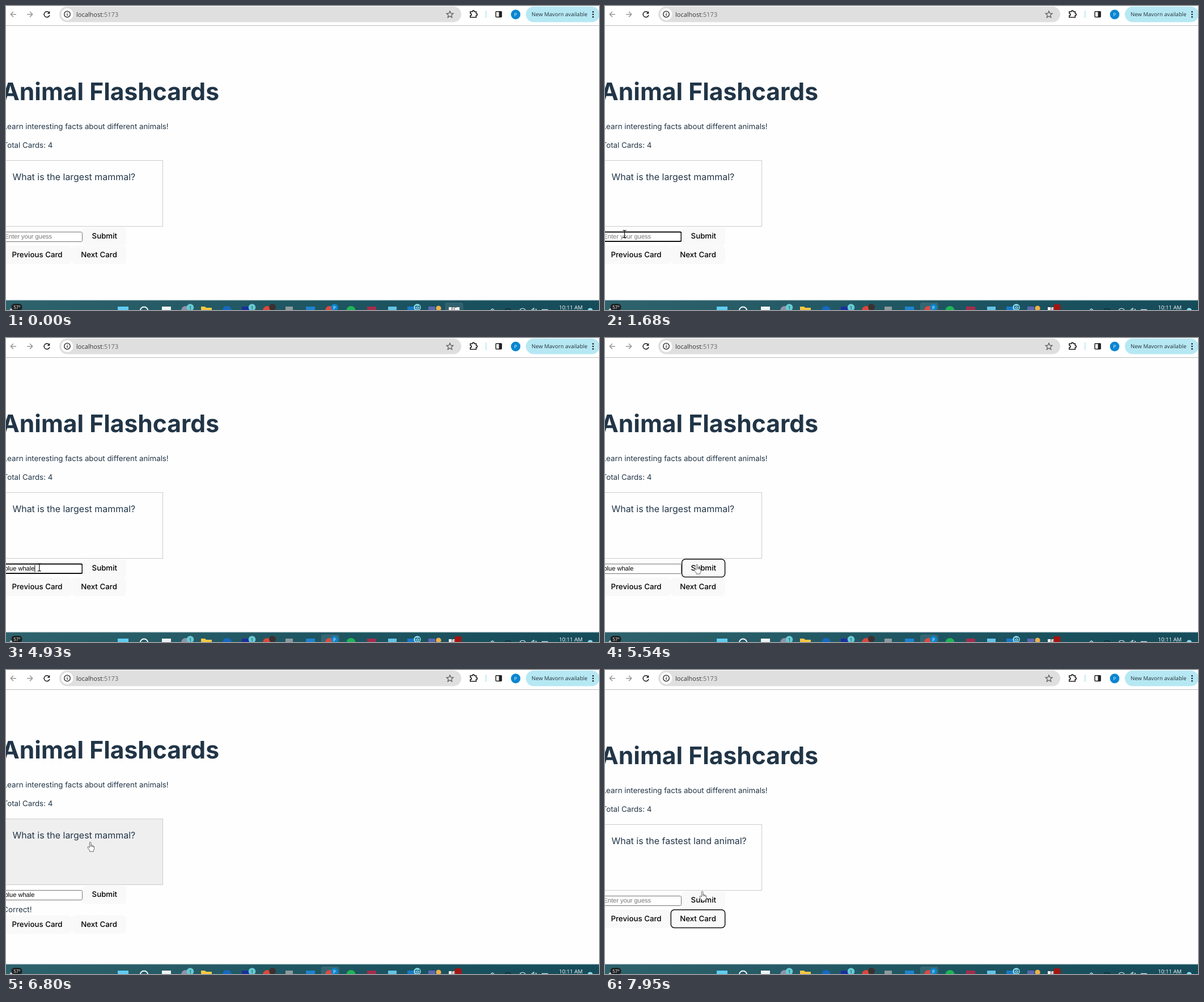
Write an HTML page that moves like this. It is 1046x536 px and loops after 8000 ms.

```html
<!DOCTYPE html>
<html lang="en">
<head>
<meta charset="utf-8">
<title>Animal Flashcards</title>
<style>
  html, body { margin: 0; width: 100%; height: 100%; overflow: hidden; background: #fefefe; }
  svg { display: block; width: 1046px; height: 536px; }
  text { font-family: Inter, sans-serif; font-size: 13.3px; font-optical-sizing: none; fill: #213547; text-rendering: geometricPrecision; }
  .end { text-anchor: end; }
  .ui { font-family: "Open Sans", "Noto Sans", sans-serif; }
  .title { font-size: 42.6px; font-weight: 700; }
  .question { font-size: 15.96px; }
  .button rect { fill: #f9f9f9; }
  .button text { font-weight: 500; fill: #000; text-anchor: middle; }
  .field { font-family: "Liberation Sans", Arial, sans-serif; font-size: 11.08px; }
  .line { fill: none; stroke: #222; stroke-width: 1.5; }
  .badge { font-size: 8px; text-anchor: middle; }
</style>
</head>
<body>
<svg viewBox="0 0 1046 536">
  <rect width="1046" height="536" fill="#fefefe"/>

  <g id="toolbar">
    <rect width="1046" height="34" fill="#fff"/>
    <rect y="34" width="1046" height="1" fill="#bdbdbd"/>
    <g class="line" style="stroke:#999">
      <path d="M18 14.7H8.5M13 10L8.3 14.7 13 19.4"/>
      <path d="M37 14.7H46.5M42 10L46.7 14.7 42 19.4"/>
    </g>
    <path class="line" d="M76 11.5A5 5 0 1 0 77 16"/>
    <path d="M77.3 9V13.7H72.6Z" fill="#222"/>
    <rect x="94" y="1" width="709" height="27.5" rx="13.7" fill="#dfdfdf"/>
    <circle cx="108" cy="14.5" r="10.5" fill="#fff"/>
    <circle class="line" cx="108" cy="14.5" r="5.3" style="stroke-width:1.3"/>
    <path class="line" d="M108 13.8V17.3M108 11.4V12.7" style="stroke-width:1.3"/>
    <text class="ui" x="124" y="18.7" style="font-size:11px;fill:#333">localhost<tspan fill="#666">:5173</tspan></text>
    <path class="line" style="stroke:#555;stroke-width:1.2" d="M783 9L784.7 12.9 788.9 13.3 785.7 16.1 786.7 20.2 783 18 779.3 20.2 780.3 16.1 777.1 13.3 781.3 12.9Z"/>
    <path class="line" style="stroke-width:1.7" d="M819 10H822.6A1.8 1.8 0 0 1 826.2 10H829.3V13A1.9 1.9 0 0 1 829.3 16.8V20H819V17A2 2 0 0 0 819 13Z"/>
    <rect x="846" y="8" width="1.5" height="13" fill="#b6e4f2"/>
    <rect class="line" x="864" y="9.7" width="10" height="9.8" rx="1"/>
    <rect x="869.5" y="9.7" width="5" height="9.8" fill="#222"/>
    <circle cx="899" cy="15" r="8.4" fill="#0a86d1"/>
    <text class="ui badge" x="899" y="17.8" style="fill:#fff">P</text>
    <rect x="917" y="1" width="130" height="27.5" rx="13.7" fill="#b6e8f3"/>
    <text class="ui" x="927" y="18.2" style="font-size:9.6px;fill:#24323a">New Mavorn available</text>
    <g fill="#222"><circle cx="1035.5" cy="10.3" r="1.4"/><circle cx="1035.5" cy="14.8" r="1.4"/><circle cx="1035.5" cy="19.3" r="1.4"/></g>
  </g>

  <g id="upper">
    <text class="title end" x="376" y="165.5">Animal Flashcards</text>
    <text class="end" x="286.7" y="217">Learn interesting facts about different animals!</text>
    <text class="end" x="82.3" y="250">Total Cards: 4</text>
    <rect id="card" x="-8.5" y="272.5" width="285" height="116" stroke="#ccc"/>
    <text class="question" id="question" x="11.5" y="307"></text>
    <rect id="input" x="-5" width="139.5" rx="2" fill="#fff"/>
    <text class="field" id="guess" x="-2.6" y="410"></text>
    <rect id="caret" y="400.5" width="1" height="12.5" fill="#000"/>
    <g class="button">
      <rect x="135" y="390" width="77" height="32.5" rx="6.5"/>
      <rect class="line" id="submitRing" x="135.6" y="390" width="76" height="31.6" rx="6" style="stroke:#101010"/>
      <text x="173.8" y="410">Submit</text>
    </g>
    <text class="end" id="correct" x="45.5" y="437">Correct!</text>
  </g>

  <g id="lower" class="button">
    <rect x="-6" y="422.5" width="122" height="32.5" rx="6.5"/>
    <text x="55" y="443">Previous Card</text>
    <rect x="116" y="422.5" width="96" height="32.5" rx="6.5"/>
    <rect class="line" id="nextRing" x="116.3" y="422.8" width="95.4" height="31.6" rx="6" style="stroke:#101010"/>
    <text x="164" y="443">Next Card</text>
  </g>

  <defs>
    <linearGradient id="teal"><stop stop-color="#2e626c"/><stop offset=".5" stop-color="#1f5662"/><stop offset="1" stop-color="#164c5a"/></linearGradient>
  </defs>
  <g id="taskbar">
    <rect y="519" width="1046" height="17" fill="url(#teal)"/>
    <rect y="518.5" width="1046" height="1" fill="#6f9299"/>
    <rect id="active" y="523.5" width="31" height="20" rx="3" fill="#fff" fill-opacity=".1" stroke="#fff" stroke-opacity=".08"/>
    <g id="icons"></g>
    <path d="M6 536L10 532 14 536Z" fill="#cfd8da"/>
    <rect x="9.5" y="525" width="19" height="12" rx="5.5" fill="#1e2224"/>
    <text class="ui badge" x="19.5" y="534" style="fill:#fff">57°</text>
    <circle cx="243.5" cy="537" r="6.6" fill="none" stroke="#f4f8f9" stroke-width="2"/>
    <path d="M344 530H351L353 532H363V536H344Z" fill="#f7c744"/>
    <circle cx="470" cy="531" r="6" fill="#3b3030"/>
    <path d="M722.5 529H729.5V534H722.5ZL726 532 729.5 529" fill="none" stroke="#124a60"/>
    <text class="ui badge" x="790" y="537" style="fill:#333">EC</text>
    <rect id="record" x="791.5" y="526" width="12" height="12" rx="3" fill="#a31512"/>
    <g fill="none" stroke="#dce7e9" stroke-width="1.2">
      <path d="M855 536L858 534 861 536M906.5 536A5 4 0 0 1 916 536M927 536L931 533V536M934 534L936 536M945 535.3H956"/>
      <path d="M880 536A6 4 0 0 1 891 536" stroke="#0d2b34"/>
    </g>
    <text class="ui" x="975.5" y="535.3" style="font-size:9.6px;fill:#fff">10:11 AM</text>
    <circle cx="1030.5" cy="537" r="4.5" fill="#8edcec"/>
  </g>

  <g id="pointer" stroke-linejoin="round">
    <path id="arrow" d="M.5 .5V14L3.6 11.2 6 16.5 8 15.6 5.7 10.4H10Z" fill="#fff" stroke="#111" stroke-width=".9"/>
    <g id="hand" fill="#fff" stroke="#333" stroke-width=".75">
      <path d="M-1.6 10V1.6Q-1.6 .3-.4 .3T.9 1.6V6Q3 5.2 3.1 7 4.9 6.2 5 8 6.6 7.5 6.6 9.3V12.4Q6.4 14 5.3 15.2V17H-1.4V15.4Q-4.2 12.4-5 9.8-4.7 7.8-3 8.8Z"/>
      <path d="M.9 6V9M3.1 7V9M5 8V9.5" fill="none"/>
    </g>
    <path id="beam" d="M-3-6.3H-1Q0-6.3 0-5.3 0-6.3 1-6.3H3M0-5.3V5.3M-3 6.3H-1Q0 6.3 0 5.3 0 6.3 1 6.3H3" fill="none" stroke="#111" stroke-width="1.2"/>
  </g>
</svg>

<script>
const LOOP = 8000;
const $ = id => document.getElementById(id);
const show = (id, on) => $(id).setAttribute('visibility', on ? 'visible' : 'hidden');
const set = (id, attrs) => { for (const k in attrs) $(id).setAttribute(k, attrs[k]); };

const square = (x, width, fill, y = 530) =>
  `<rect x="${x}" y="${y}" width="${width}" height="${536 - y}" fill="${fill}"/>`;
const disc = (x, fill, y = 537, r = 8) => `<circle cx="${x}" cy="${y}" r="${r}" fill="${fill}"/>`;
const badge = (x, fill, label = '', ink = '#123', y = 531.5) =>
  disc(x, fill, y, 6.3) + `<text class="ui badge" x="${x}" y="${y + 3}" style="fill:${ink}">${label}</text>`;

$('icons').innerHTML = [
  square(197, 19, '#5fcdf2'), square(275, 16, '#eef2f3'),
  disc(317, '#8d93a8'), badge(325, '#66cbd4', '1'),
  disc(390, '#1769bd'),
  square(416, 14, '#1b2f9c'), badge(434, '#66cbd4', '1'),
  disc(461, '#d9483b'), square(493, 13, '#8d999d'), square(529, 16, '#1e83cf'),
  disc(571, '#dd4b3e'), badge(579.5, '#0a86d1', 'P', '#fff'),
  disc(608.5, '#1fb455'), square(637, 16, '#a52c4c'), square(674, 15, '#64c3e6'),
  square(708, 15, '#1979c9'), badge(725.5, '#8bdcf0'),
  square(745, 12, '#5b67b5'), disc(763, '#eeb04b', 533, 4.6),
  square(781, 19, '#f1f1f1', 531)
].join('');

// Pointer moves: start, end, number of steps, points passed
const moves = [
  [210, 550, 6, [[794, 523], [690, 470], [426, 348]]],
  [740, 1400, 9, [[400, 352], [240, 374], [100, 402], [50, 416], [34.5, 402]]],
  [4850, 5400, 9, [[40, 403], [90, 407], [145, 404], [162.5, 399]]],
  [5810, 6210, 7, [[162, 394], [155, 350], [149, 303]]],
  [7000, 7411, 7, [[150, 312], [165, 375], [181, 456], [182, 453]]],
  [7880, 7950, 2, [[178, 425], [172, 390]]]
];

const fieldX = -2.6, fieldSize = 11.08;
const keys = [1990, 2260, 2590, 2810, 2940, 3150, 3620, 3820, 4140, 4410];
const advance = { b: .556, l: .222, u: .556, e: .556, ' ': .278, w: .722, h: .556, a: .556 };

function pointerAt(t) {
  const move = moves.filter(m => t >= m[0]).pop();
  if (!move) return null;
  const [from, to, steps, points] = move;
  const step = Math.min(steps - 1, Math.floor((t - from) / (to - from) * (steps - 1) + .05));
  const u = step / (steps - 1) * (points.length - 1);
  const i = Math.min(points.length - 2, Math.floor(u));
  return points[i].map((v, axis) => v + (points[i + 1][axis] - v) * (u - i));
}

function hitTest([x, y], shift) {
  const inside = (x0, x1, y0, y1) => x >= x0 && x < x1 && y >= y0 && y < y1;
  if (inside(0, 277, 272 - shift, 389 - shift)) return 'card';
  if (inside(0, 135, 398 - shift, 416 - shift)) return 'input';
  if (inside(135, 212, 389 - shift, 422 - shift) || inside(0, 212, 422 + shift, 455 + shift)) return 'button';
  return 'page';
}

function render(t) {
  const answered = t >= 5610 && t < 7480;
  const nextCard = t >= 7480;
  const focused = t >= 1540 && t < 5470;
  const shift = answered ? 10 : 0;

  set('upper', { transform: `translate(0 ${-shift})` });
  set('lower', { transform: `translate(0 ${shift})` });
  show('correct', answered);
  show('submitRing', t >= 5470 && t < 5810);
  show('nextRing', t >= 7411);
  $('question').textContent = nextCard ? 'What is the fastest land animal?' : 'What is the largest mammal?';

  const typed = nextCard ? '' : 'blue whale'.slice(0, keys.filter(k => t >= k).length);
  $('guess').textContent = typed || 'Enter your guess';
  $('guess').style.fill = typed ? '#000' : '#757575';
  show('caret', focused && typed);
  set('caret', { x: fieldX + fieldSize * [...typed].reduce((sum, c) => sum + advance[c], 0) });
  set('input', focused
    ? { y: 398.5, height: 16.5, stroke: '#101010', 'stroke-width': 2 }
    : { y: 398.5, height: 17, stroke: '#767676', 'stroke-width': 1 });

  show('record', t >= 70);
  set('active', { x: t < 1540 ? 775 : 556.5 });

  const pos = pointerAt(t);
  const over = pos ? hitTest(pos, shift) : '';
  set('card', { fill: over === 'card' ? '#efefef' : '#fefefe' });
  if (pos) set('pointer', { transform: `translate(${pos[0].toFixed(1)} ${pos[1].toFixed(1)})` });
  show('arrow', over === 'page');
  show('beam', over === 'input');
  show('hand', over === 'card' || over === 'button');
}

const start = performance.now();
function tick() {
  render((performance.now() - start) % LOOP);
  requestAnimationFrame(tick);
}
tick();
</script>
</body>
</html>
```
